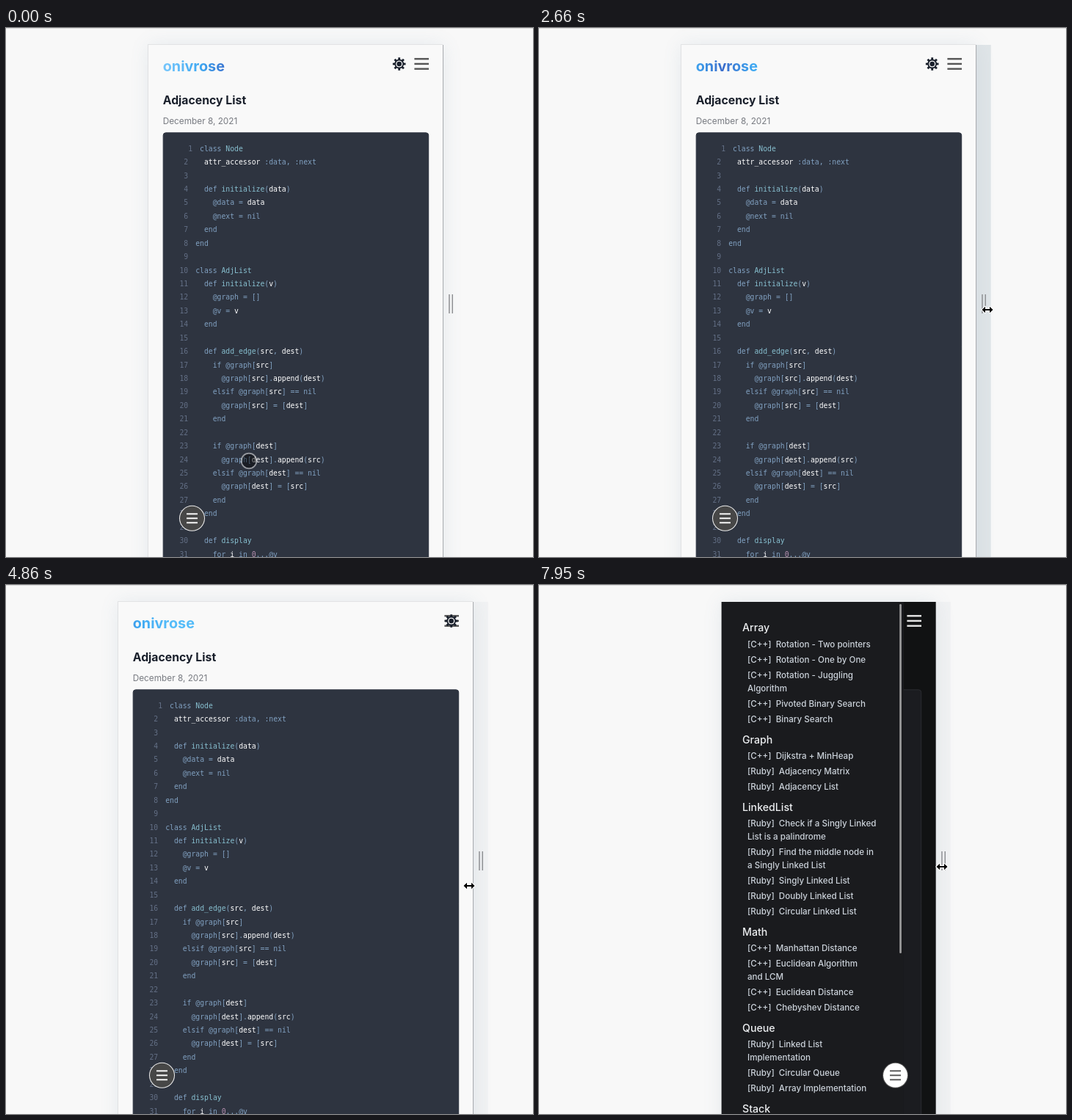
An HTML page with a canvas that plays this animation: 718x721 px, repeating every 8 s.

```html
<!DOCTYPE html>
<html lang="en">
<head>
<meta charset="utf-8">
<title>Responsive code notes</title>
<style>
  html, body { margin: 0; width: 100%; height: 100%; overflow: hidden; background: #f8f8f8; }
  canvas { display: block; }
</style>
</head>
<body>
<canvas id="stage" width="718" height="721"></canvas>
<script>
const ctx = document.getElementById('stage').getContext('2d');
const LOOP = 8000, TICK = 147.2;
const CENTER = 394.7, TOP = 23, BOTTOM = 721;
const SANS = 'Inter, sans-serif', MONO = '"DejaVu Sans Mono", monospace';

const LIGHT = {
  page: '#f9f9f9', panel: '#eeeeee', code: '#2e3440', edge: '#2e3440', ink: '#1a202c', item: '#4a5568',
  date: '#777a80', bars: '#555555', scroll: '#d3d3d3', button: '#474747', ring: '#eeeeee', buttonBars: '#ffffff'
};
const DARK = {
  page: '#111213', panel: '#1a1b1e', code: '#1b1c20', edge: '#2b2c30', ink: '#eceef0', item: '#cbd2da',
  date: '#9a9ea5', bars: '#e6e6e6', scroll: '#9b9b9b', button: '#ffffff', ring: '#555555', buttonBars: '#555555'
};

// Line breaks: ~ sidebar, | narrow drawer, ^ wide drawer
const MENU = [
  ['Array', '[C++] Rotation -~ Two pointers', '[C++] Rotation -~ One by One',
    '[C++] Rotation -~ Juggling~| Algorithm', '[C++] Pivoted~ Binary Search', '[C++] Binary~ Search'],
  ['Graph', '[C++] Dijkstra +~ MinHeap', '[Ruby]~ Adjacency Matrix', '[Ruby]~ Adjacency List'],
  ['LinkedList', '[Ruby] Check if~ a Singly Linked~| List is a~^ palindrome',
    '[Ruby] Find the~ middle node in| a~ Singly Linked^ List',
    '[Ruby] Singly~ Linked List', '[Ruby] Doubly~ Linked List', '[Ruby] Circular~ Linked List'],
  ['Math', '[C++] Manhattan~ Distance', '[C++] Euclidean~ Algorithm| and~ LCM',
    '[C++] Euclidean~ Distance', '[C++] Chebyshev~ Distance'],
  ['Queue', '[Ruby] Linked List| Implementation', '[Ruby] Circular Queue', '[Ruby] Array Implementation'],
  ['Stack', '[Ruby] Valid Parenthesis', '[Ruby] Evaluate Postfix', '[Ruby] Infix to Postfix']
].map(group => group.map(entry => entry.replace('a~ Singly Linked^', 'a~ Singly Linked^')));

const CODE = ` class Node
  attr_accessor :data, :next

  def initialize(data)
    @data = data
    @next = nil
  end
end

class AdjList
  def initialize(v)
    @graph = []
    @v = v
  end

  def add_edge(src, dest)
    if @graph[src]
      @graph[src].append(dest)
    elsif @graph[src] == nil
      @graph[src] = [dest]
    end

    if @graph[dest]
      @graph[dest].append(src)
    elsif @graph[dest] == nil
      @graph[dest] = [src]
    end
  end

  def display
    for i in 0...@v`.split('\n').map(tokenize);

// Motion tracks: [tick, value, ...]
const WIDTH = [[19, 402], [23, 667], [27, 667], [32, 518], [33, 484], [36, 292]];
const DRAWER = [[3, 0], [6, 1], [13, 1], [15, 0], [48, 0], [51, 1]];
const STRIP = [[0, 0], [11, .05], [15, .05], [17, .4], [19, .4], [22, .12]];
const GLOW = [[0, 1.1], [8, 1.5], [18, .45], [24, -.05], [28, -.5], [33, -.4], [40, 1.05], [54, 1.1]];
const POINTER = [[0, 331, 590], [3, 256, 668], [5, 256, 668], [8, 505, 701], [11, 505, 701], [12, 512, 672],
  [14, 512, 672], [16, 625, 400], [18, 611, 384], [19, 611, 384], [23, 744, 395], [27, 744, 400],
  [33, 631, 410], [36, 556, 405], [40, 471, 116], [42, 480, 50], [44, 480, 50], [48, 308, 668],
  [51, 308, 668], [54, 549, 384]];

function track(keys, tick, index = 1) {
  const next = keys.findIndex(key => key[0] > tick);
  if (next < 0) return keys[keys.length - 1][index];
  if (next === 0) return keys[0][index];
  const a = keys[next - 1], b = keys[next];
  return a[index] + (b[index] - a[index]) * (tick - a[0]) / (b[0] - a[0]);
}

function tokenize(line) {
  let previous = '';
  return [...line.matchAll(/[@:]?\w+|[^\w\s@:]+/g)].map(match => {
    const word = match[0];
    let color = '#ffffff';
    if (/^(class|def)$/.test(previous)) color = '#88c0d0';
    else if (/^\d/.test(word)) color = '#b48ead';
    else if (/^(class|def|end|if|elsif|nil|for|in)$|^\W/.test(word)) color = '#81a1c1';
    previous = word;
    return { word, color, column: match.index };
  });
}

function rect(x, y, w, h, color) {
  ctx.fillStyle = color;
  ctx.fillRect(x, y, w, h);
}

function disc(x, y, r, color) {
  ctx.fillStyle = color;
  ctx.beginPath();
  ctx.arc(x, y, r, 0, 7);
  ctx.fill();
}

// y is the middle of the capitals
function text(string, x, y, size, color, { weight = 400, family = SANS, align = 'left' } = {}) {
  ctx.font = `${weight} ${size}px ${family}`;
  ctx.textAlign = align;
  ctx.fillStyle = color;
  ctx.fillText(string, x, y + size * .35);
}

function hamburger(x, y, width, gap, thickness, color) {
  for (const row of [-1, 0, 1]) rect(x - width / 2, y + row * gap - thickness / 2, width, thickness, color);
}

function gear(x, y, scale, theme) {
  ctx.save();
  ctx.translate(x, y);
  ctx.scale(scale, scale);
  for (let i = 0; i < 8; i++) {
    rect(-1.4, -8.8, 2.8, 5, theme.ink);
    ctx.rotate(Math.PI / 4);
  }
  disc(0, 0, 6.4, theme.ink);
  disc(0, 0, 4.6, theme.page);
  disc(0, 0, 3.3, theme.ink);
  ctx.restore();
}

function logo(x, glow) {
  const width = 83;
  const gradient = ctx.createLinearGradient(x + (glow - 1) * width, 0, x + (glow + 1) * width, 0);
  gradient.addColorStop(0, '#72c4fb');
  gradient.addColorStop(.25, '#3fa9f2');
  gradient.addColorStop(.5, '#3a6ccb');
  gradient.addColorStop(.75, '#3fa9f2');
  gradient.addColorStop(1, '#55bcf9');
  text('onivrose', x, 52.5, 19.8, gradient, { weight: 700 });
}

function article(left, right, top, theme) {
  text('Adjacency List', left, top - 44, 15.8, theme.ink, { weight: 700 });
  text('December 8, 2021', left, top - 15, 11.8, theme.date);
  ctx.fillStyle = theme.code;
  ctx.strokeStyle = theme.edge;
  ctx.lineWidth = 1;
  ctx.beginPath();
  ctx.roundRect(left + .5, top + .5, right - left - 1, 700, 3.5);
  ctx.fill();
  ctx.stroke();
  ctx.save();
  ctx.clip();
  CODE.forEach((tokens, row) => {
    const y = top + 22 + row * 18.43;
    text(row + 1, left + (row ? 34.5 : 40.4), y, 9.77, '#636f85', { family: MONO, align: 'right' });
    for (const { word, color, column } of tokens)
      text(word, left + 44.5 + column * 5.88, y, 9.77, color, { family: MONO });
  });
  ctx.restore();
}

function menu(x, width, mark, scrollLength, theme) {
  rect(x, TOP, width, BOTTOM - TOP, theme.panel);
  ctx.fillStyle = theme.scroll;
  ctx.beginPath();
  ctx.roundRect(x + width - 5.7, 26, 2.7, scrollLength, 1.3);
  ctx.fill();
  let y = 58.5;
  for (const [heading, ...items] of MENU) {
    text(heading, x + 28.3, y, 14.2, theme.ink, { weight: 500 });
    y += 22.2;
    for (const item of items) {
      const lines = item.split(mark).map(line => line.replace(/[~|^]/g, '').trim().replace('] ', ']\u00a0\u00a0'));
      lines.forEach((line, i) => text(line, x + 35.3, y + i * 17.6, 11.6, theme.item, { weight: 500 }));
      y += (lines.length - 1) * 17.6 + 21.1;
    }
    y += 6.9;
  }
}

function menuButton(x, y, theme) {
  disc(x, y, 17.5, theme.ring);
  disc(x, y, 16.5, theme.button);
  hamburger(x, y, 15, 6, 1.9, theme.buttonBars);
}

function page(tick, width, theme) {
  const left = CENTER - width / 2, right = CENTER + width / 2;
  const glow = track(GLOW, tick);

  ctx.save();
  ctx.shadowColor = 'rgba(90, 130, 160, .13)';
  ctx.shadowBlur = 24;
  rect(left, TOP, width, 760, theme.page);
  ctx.restore();

  ctx.save();
  ctx.beginPath();
  ctx.rect(left, TOP, width, BOTTOM - TOP);
  ctx.clip();
  if (width > 538) {
    const contentLeft = left + width / 4 + 58.5;
    const nav = { weight: 500 };
    logo(contentLeft, glow);
    text('Blog', right - 183.3, 52, 13.9, theme.ink, nav);
    text('CP', right - 133.3, 52, 13.9, theme.ink, nav);
    text('DSA', right - 94.3, 52, 13.9, theme.ink, nav);
    gear(right - 22.2, 52, .8, theme);
    article(contentLeft, right - 29, 170.3, theme);
    menu(left, width / 4, '~', 299, theme);
  } else {
    const open = track(DRAWER, tick);
    const drawerWidth = width * .85;
    logo(left + 20, glow);
    hamburger(right - 29.5, 48.9, 19.6, 6.8, 2.4, theme.bars);
    gear(right - (width > 448 ? 30 : 60), 49, 1, theme);
    article(left + 20, right - 19.5, 142.3, theme);
    if (open > 0) {
      const narrow = width < 350;
      menu(left - drawerWidth * (1 - open), drawerWidth, narrow ? '|' : '^', narrow ? 476 : 530, theme);
    }
    menuButton(left + 59.8 + (width * .745 - 40.5) * open, 668.3, theme);
  }
  ctx.restore();

  if (theme === LIGHT) {
    rect(Math.floor(left), TOP - 1, width, 1, '#e2e3e4');
    rect(Math.floor(left), TOP, 1, BOTTOM, '#e0e1e3');
  }
  rect(right, TOP, 20, BOTTOM, `rgba(185, 198, 206, ${track(STRIP, tick)})`);
  if (width > 300) rect(Math.floor(right), TOP, 1, BOTTOM, '#a9abaf');
  rect(right + 7.5, 363, 1.5, 26, '#8f9194');
  rect(right + 11.8, 363, 1.5, 26, '#8f9194');
}

function touchPointer(x, y) {
  disc(x, y, 9.6, 'rgba(0, 0, 0, .43)');
  ctx.strokeStyle = 'rgba(255, 255, 255, .5)';
  ctx.lineWidth = 1.8;
  ctx.beginPath();
  ctx.arc(x, y, 10.4, 0, 7);
  ctx.stroke();
}

function resizePointer(x, y) {
  const shape = new Path2D('M-7.5 0L-3-4.2V-1.1H3V-4.2L7.5 0L3 4.2V1.1H-3V4.2Z');
  ctx.save();
  ctx.translate(x, y);
  ctx.lineJoin = 'round';
  ctx.lineWidth = 2.2;
  ctx.strokeStyle = '#ffffff';
  ctx.stroke(shape);
  ctx.fillStyle = '#000000';
  ctx.fill(shape);
  ctx.restore();
}

function draw(now) {
  const tick = Math.floor((now % LOOP) / TICK);
  rect(0, 0, 718, 721, '#f8f8f8');
  rect(0, 0, 718, 1, '#dcdcdc');
  page(tick, track(WIDTH, tick), tick >= 43 ? DARK : LIGHT);

  const resizing = (tick >= 16 && tick < 37) || tick >= 54;
  const pointer = resizing ? resizePointer : touchPointer;
  pointer(track(POINTER, tick), track(POINTER, tick, 2));
}

const start = performance.now();
function frame() {
  draw(performance.now() - start);
  requestAnimationFrame(frame);
}
frame();
</script>
</body>
</html>
```
